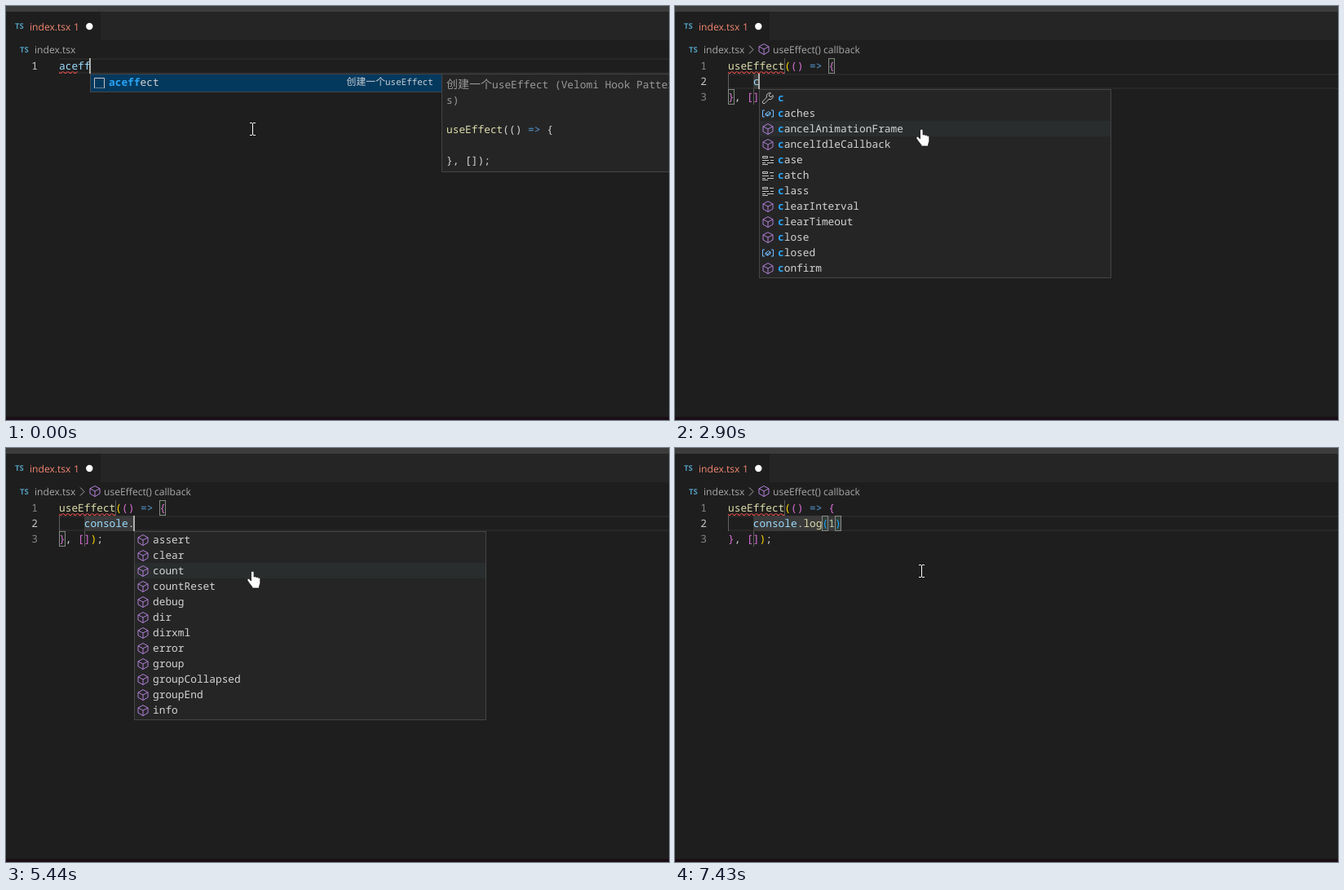
Recreate the animation shown at these times as an HTML page. Size 813 px wide and 508 px high, loop 8 s.

```html
<!DOCTYPE html>
<html lang="en">
<head>
<meta charset="utf-8">
<title>Editor snippet</title>
<style>
  html, body { margin: 0; width: 100%; height: 100%; overflow: hidden; background: #1e1e1e; }
  svg { display: block; }
  text {
    font: 500 12.83px "Noto Sans Mono", monospace;
    fill: #d4d4d4; white-space: pre; text-rendering: geometricPrecision;
  }
  .ui { font: 400 12.1px "Open Sans", "Noto Sans", sans-serif; fill: #a9a9a9; }
  .ts { font: 700 9.5px "Open Sans", sans-serif; fill: #519aba; }
  .err { fill: #f48771; }
  .cjk { font: 400 14px "Noto Sans CJK SC", "Noto Sans CJK", sans-serif; }
  .hint { font-size: 10.9px; fill: #c8d0d6; }
  .hint .cjk { font-size: 11.9px; }
  .doc { fill: #999; }
  .hit { fill: #2aa4f4; font-weight: 700; }
  .line { fill: none; stroke-width: 1; }
  .method { stroke: #b180d7; }
  .variable { stroke: #75beff; }
  .keyword, .tool, .snippet { stroke: #c5c5c5; }
</style>
</head>
<body>
<svg width="813" height="508" viewBox="0 0 813 508">
  <defs>
    <pattern id="wave" width="6" height="3" patternUnits="userSpaceOnUse">
      <path fill="#f14c4c" d="M5.5 0 2.5 3H1.1L4.1 0zM4 0 6 2V.6L5.4 0zM0 2 1 3H2.4L0 .6z"/>
    </pattern>
    <path id="method" d="M8 1.6 14 4.8V11L8 14.5 2 11V4.8zM2 4.8 8 8l6-3.2M8 8v6.5"/>
    <path id="variable" d="M4 4H1.5v8H4M12 4h2.5v8H12M5 8.2 8.5 5.6 11 6.8V9L7.5 11 5 9.8zL7.5 9.4 11 6.8M7.5 9.4V11"/>
    <path id="keyword" d="M1.5 3.5h6v2h-6zM10 4.5h5M1 8.5h8M11 8.5h4M1 11.5h4M1 13.5h7M7 11.5h8"/>
    <path id="tool" d="M14.2 4.5 12 6.6 9.8 6 9.4 4 11.5 1.8A4 4 0 0 0 6.5 7L1.8 11.8A1.6 1.6 0 0 0 4.2 14.2L9 9.4A4 4 0 0 0 14.2 4.5z"/>
    <path id="snippet" d="M2.5 14V2.5h12V14M2 14.5h1M4 14.5h1M6 14.5h1M8 14.5h1M10 14.5h1M12 14.5h1M14 14.5h1"/>
  </defs>
  <rect width="813" height="508" fill="#1e1e1e"/>
  <rect width="813" height="7" fill="#3c3c3c"/>
  <rect y="7" width="813" height="35" fill="#252526"/>
  <rect y="504" width="813" height="4" fill="#1b0f15"/>
  <g id="stage"></g>
</svg>
<script>
const LOOP = 8000, LEFT = 65, TOP = 64, CHAR = 7.7, ROW = 19, LIST_W = 432;
const C = {
  text: '#d4d4d4', name: '#9cdcfe', call: '#dcdcaa', arrow: '#569cd6', num: '#b5cea8',
  gold: '#ffd700', pink: '#da70d6', blue: '#179fff'
};

// Each label: icon letter, then the text with matched parts in square brackets.
const ICONS = { m: 'method', v: 'variable', k: 'keyword', t: 'tool', s: 'snippet' };
const LISTS = {
  aceff: 's[aceff]ect',
  c: 't[c] v[c]aches m[c]ancelAnimationFrame m[c]ancelIdleCallback k[c]ase k[c]atch k[c]lass ' +
     'm[c]learInterval m[c]learTimeout m[c]lose v[c]losed m[c]onfirm',
  con: 'm[con]firm v[con]sole k[con]st v[Con]stantSourceNode k[con]tinue v[Con]volverNode ' +
       'm[c]ancelAnimati[on]Frame v[c]ross[O]rigi[n]Isolated v[Co]u[n]tQueuingStrategy ' +
       'mdecodeURI[Co]mpo[n]ent mencodeURI[Co]mpo[n]ent vHTMLForm[Con]trolsCollection',
  conso: 'v[conso]le v[Cons]tantS[o]urceNode v[c]ross[O]rigi[n]I[so]lated ' +
         'vDynamics[Co]mpres[s]or[No]de vHTMLForm[Con]trol[s]C[o]llection',
  consol: 'v[consol]e v[c]ross[O]rigi[n]I[sol]ated vHTMLForm[Con]trol[s]C[ol]lection',
  console: 'v[console] v[c]ross[O]rigi[n]I[sol]at[e]d vHTMLForm[Con]trol[s]C[ol]l[e]ction',
  'console.': 'massert mclear mcount mcountReset mdebug mdir mdirxml merror mgroup ' +
              'mgroupCollapsed mgroupEnd minfo',
  'console.l': 'm[l]og mtime[L]og mc[l]ear mdirxm[l] mgroupCo[l]lapsed mtab[l]e',
  'console.lo': 'm[lo]g mtime[Lo]g mgr[o]upCo[l]lapsed',
  'console.log': 'm[log] mtime[Log]'
};

const type = typed => ({ typed, list: typed, col: 4 + typed.length, caret: true });
const on = { caret: true }, off = { caret: false };

const STEPS = [
  [0, { open: false, typed: '', list: 'aceff', col: 5, caret: true, wave: 3, wave2: false, crumb: false, errors: 1 }],
  [420, { caret: false, wave: 5 }],
  [980, on],
  [1500, { open: true, list: '', col: 4 }],
  [1810, { crumb: true, wave: 9 }],
  [1970, off],
  [2490, on],
  [2900, type('c')],
  [3030, type('con')],
  [3170, type('conso')],
  [3550, { wave2: true }],
  [3690, off],
  [3810, { errors: 2 }],
  [4190, on],
  [4460, type('consol')],
  [4620, type('console')],
  [4880, { wave2: false }],
  [5010, { errors: 1 }],
  [5140, off],
  [5440, type('console.')],
  [5590, type('console.l')],
  [5720, type('console.lo')],
  [5870, type('console.log')],
  [6030, { typed: 'console.log()', list: '', col: 16 }],
  [6170, { col: 17 }],
  [6590, off],
  [6740, { col: 16, caret: true }],
  [6870, { typed: 'console.log(1)', col: 17 }],
  [7020, { col: 18 }],
  [7430, off]
];
const states = [];
STEPS.forEach(([, change], i) => states.push({ ...states[i - 1], ...change }));

const colX = n => LEFT + n * CHAR;
const rect = (x, y, w, h, fill) => `<rect x="${x}" y="${y}" width="${w}" height="${h}" fill="${fill}"/>`;
const frame = (x, y, w, h, stroke, fill) =>
  `<rect x="${x + .5}" y="${y + .5}" width="${w - 1}" height="${h - 1}" fill="${fill}" stroke="${stroke}"/>`;
const text = (x, y, body, cls = '') => `<text x="${x}" y="${y}" class="${cls}">${body}</text>`;
const path = (d, stroke, fill = 'none', width = 1) =>
  `<path d="${d}" stroke="${stroke}" fill="${fill}" stroke-width="${width}"/>`;
const icon = (name, x, y) => `<use href="#${name}" x="${x}" y="${y}" class="line ${name}"/>`;
const cjk = s => `<tspan class="cjk">${s}</tspan>`;
// Coloured code from alternating colour and text.
const code = (...p) => p.map((s, i) => i % 2 ? `<tspan fill="${C[p[i - 1]]}">${s.replace('>', '&gt;')}</tspan>` : '').join('');
const squiggle = (x, y, w) => `<g transform="translate(${x} ${y})">${rect(0, 0, w, 3, 'url(#wave)')}</g>`;
const match = (col, line) => frame(Math.round(colX(col) - .2), TOP + line * ROW, 8, ROW, '#888', 'rgba(0,100,0,.1)');
const tabstop = (col, line, n = 0) =>
  rect(Math.round(colX(col)), TOP + line * ROW, Math.max(1, n * CHAR), ROW, n ? '#3a3a3a' : '#5a5a5a');

function header(s) {
  const grow = (s.errors - 1) * 2;
  let out = rect(0, 7, 116 + grow, 35, '#1e1e1e') +
    text(11, 28, 'TS', 'ts') + text(29, 29.5, 'index.tsx', 'ui err') + text(83, 29.5, s.errors, 'ui err') +
    `<circle cx="${102.3 + grow}" cy="25" r="4.2" fill="#fff"/>` +
    text(17, 57, 'TS', 'ts') + text(35, 58, 'index.tsx', 'ui');
  if (s.crumb) out += path('M91 48.5 96 53.5 91 58.5', '#a9a9a9') + icon('method', 101, 45) +
    text(120, 58, 'useEffect() callback', 'ui');
  return out;
}

function editor(s) {
  const active = s.open ? 1 : 0, y = TOP + active * ROW, rows = s.open ? 3 : 1;
  let out = rect(LEFT, y, 748, 2, '#282828') + rect(LEFT, y + ROW - 2, 748, 2, '#282828');
  for (let i = 0; i < rows; i++)
    out += `<text x="39" y="${78 + i * ROW}" text-anchor="end" style="fill:${i === active ? '#c6c6c6' : '#858585'}">${i + 1}</text>`;

  if (!s.open) {
    out += text(LEFT, 78, code('name', 'aceff'));
  } else {
    const call = s.typed.includes('(');
    out += rect(LEFT, 83, 1, ROW, '#606060') + tabstop(9, 0) + tabstop(4, 1, s.typed.length) + tabstop(4, 2) +
      (call ? match(15, 1) + match(3 + s.typed.length, 1) : match(16, 0) + match(0, 2)) +
      text(LEFT, 78, code('call', 'useEffect', 'gold', '(', 'pink', '() ', 'arrow', '=> ', 'pink', '{')) +
      text(LEFT, 116, code('pink', '}', 'text', ', ', 'pink', '[]', 'gold', ')', 'text', ';'));
    const [obj, member] = s.typed.split('.');
    let parts = ['name', obj];
    if (member !== undefined) parts.push('text', '.');
    if (call) parts.push('call', 'log', 'blue', '(', 'num', member.slice(4, -1), 'blue', ')');
    else if (member) parts.push('name', member);
    out += text(colX(4), 97, code(...parts));
  }

  out += squiggle(LEFT, 80, Math.floor(s.wave * CHAR));
  if (s.wave2) out += squiggle(96, 99, 37);
  if (s.errors > 1) out += '<circle cx="73" cy="89" r="4.8" fill="#75beff"/>' +
    rect(71, 92, 4, 5, '#75beff') + '<circle cx="77.2" cy="95.3" r="2.2" fill="#1e1e1e" stroke="#75beff" stroke-width="1.4"/>';
  if (s.caret) out += rect(Math.floor(colX(s.col) - .55), y, 2, ROW, '#aeafad');
  return out;
}

function popup(s) {
  if (!s.list) return '';
  const items = LISTS[s.list].split(' ');
  const x = Math.round(colX(s.col) - .18), y = TOP + ROW * (s.open ? 2 : 1);
  let out = frame(x, y, LIST_W, items.length * ROW + 4, '#454545', '#252526');
  items.forEach((item, i) => {
    const top = y + 1 + i * ROW;
    if (!s.open) out += rect(x + 1, top, LIST_W - 2, ROW + 2, '#04395e');
    else if (i === 2) out += rect(x + 1, top, LIST_W - 2, ROW, '#2a2d2e');
    const label = item.slice(1).replace(/\[(.+?)\]/g, '<tspan class="hit">$1</tspan>');
    out += icon(ICONS[item[0]], x + 3, top + 2) + text(x + 23, top + 14, label);
  });
  return s.open ? out : out + docs();
}

function docs() {
  const title = cjk('创建一个') + 'useEffect';
  return text(417.5, 97, title, 'hint') + frame(534, 83, 300, 121, '#454545', '#252526') +
    text(540, 101, title + ' (Velomi Hook Pattern', 'doc') + text(540, 120, 's)', 'doc') +
    text(540, 156, code('call', 'useEffect', 'text', '(() ', 'arrow', '=> ', 'text', '{')) +
    text(540, 194, '}, []);');
}

function pointer(s) {
  const hand = s.list && LISTS[s.list].split(' ').length > 2;
  return hand
    ? path('M300.5 153c0-2.4 3.6-2.4 3.6 0v5.2c.8-1 2.6-.6 2.9.6.9-.9 2.5-.4 2.7.8.9-.6 2.1 0 2.1 1.4v4.5c0 2-1.3 3.2-1.3 5v1.5h-8.6v-1.4c-1.6-2.2-4.4-5.5-5.8-8.2-.8-1.8 1.2-2.9 2.6-1.5l1.8 2.2z', '#111', '#fff', .8)
    : path('M299 143.5h3M303 143.5h3M302.5 144v14M299 158.5h3M303 158.5h3', '#fff');
}

const stage = document.getElementById('stage');
let shown = -1;
function tick() {
  const t = performance.now() % LOOP;
  const i = STEPS.filter(([at]) => at <= t).length - 1;
  if (i !== shown) {
    const s = states[shown = i];
    stage.innerHTML = header(s) + editor(s) + popup(s) + pointer(s);
  }
  requestAnimationFrame(tick);
}
tick();
</script>
</body>
</html>
```
